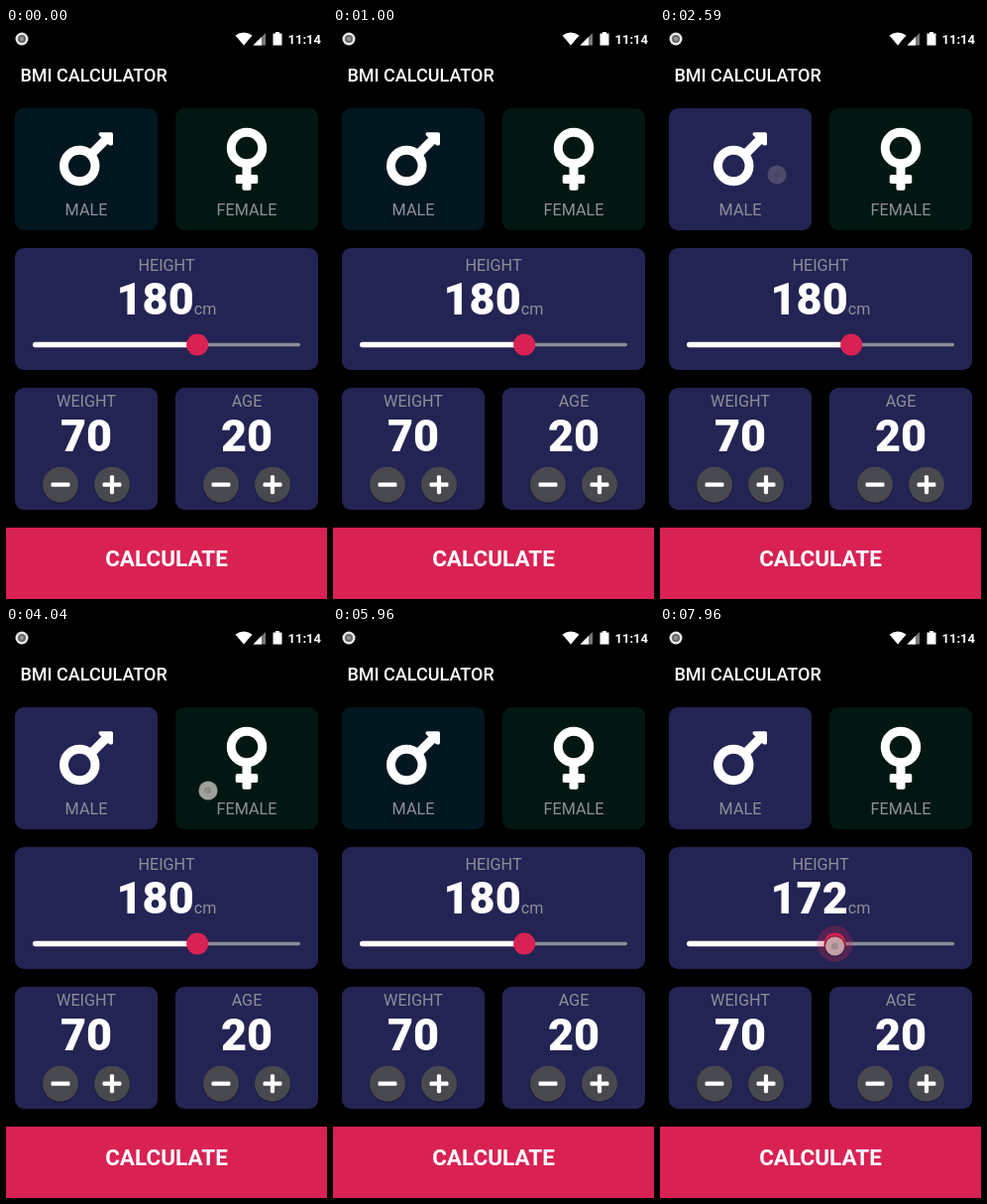
Write an HTML page that moves like this. It is 324 px wide and 576 px high and loops after 8000 ms.

```html
<!DOCTYPE html>
<html lang="en">
<head>
<meta charset="utf-8">
<title>BMI calculator</title>
<style>
  html, body { margin: 0; width: 100%; height: 100%; overflow: hidden; background: #000; }
  svg { display: block; width: 100%; height: 100%; font-family: Roboto, sans-serif; }
  .card { fill: #242454; }
  .label { font-size: 16.2px; fill: #8d8e98; }
  .number { font-size: 45px; font-weight: 900; }
  .mid { text-anchor: middle; }
  .white, .number { fill: #fff; }
  .ring { fill: none; stroke: #fff; stroke-width: 64; }
</style>
</head>
<body>
<svg viewBox="0 0 324 576">
  <defs>
    <g id="round">
      <circle cy="1" r="18.5" fill="#15152f" opacity=".6"/>
      <circle r="18" fill="#48494f"/>
      <rect class="white" x="-9.5" y="-2.1" width="19" height="4.2" rx="1.4"/>
    </g>
    <g id="plus">
      <use href="#round"/>
      <rect class="white" x="-2.1" y="-9.5" width="4.2" height="19" rx="1.4"/>
    </g>
  </defs>

  <!-- Status bar -->
  <circle cx="16" cy="11" r="6.5" fill="#e8e8e8"/>
  <circle cx="16" cy="11" r="4" fill="#666"/>
  <circle cx="16" cy="11" r="2" fill="#999"/>
  <path class="white" d="M231.5 7.5Q240 1.5 248.5 7.5L240 17.5Z"/>
  <path fill="#777" d="M249.5 17.5L262 5V17.5Z"/>
  <path class="white" d="M249.5 17.5L258 9V17.5Z"/>
  <path class="white" d="M269.5 5.5H272V4H276V5.5H278.5V17.5H269.5Z"/>
  <text class="white" x="284.5" y="16" font-size="13" font-weight="600">11:14</text>
  <text class="white" x="14.4" y="54" font-size="18" font-weight="500">BMI CALCULATOR</text>

  <!-- Gender cards -->
  <rect id="male" class="card" x="9" y="81" width="144" height="123" rx="9"/>
  <rect id="female" class="card" x="171" y="81" width="144" height="123" rx="9"/>
  <g transform="translate(54 96.3) scale(.1406)">
    <circle class="ring" cx="144" cy="304" r="112"/>
    <path d="M230 218L340 108" stroke="#fff" stroke-width="64"/>
    <path class="white" d="M372 64H293C282.3 64 277 76.9 284.5 84.4L351.6 151.5C359.2 159.1 384 165.7 384 143V76C384 69.4 378.6 64 372 64Z"/>
  </g>
  <g transform="translate(222.75 96.3) scale(.1406)">
    <circle class="ring" cx="144" cy="176" r="112"/>
    <rect class="white" x="112" y="300" width="64" height="180" rx="12"/>
    <rect class="white" x="64" y="368" width="160" height="64" rx="12"/>
  </g>
  <text class="label mid" x="81" y="189">MALE</text>
  <text class="label mid" x="243" y="189">FEMALE</text>

  <!-- Height card -->
  <rect class="card" x="9" y="222" width="306" height="123" rx="9"/>
  <text class="label mid" x="162" y="245">HEIGHT</text>
  <text class="mid" x="162" y="289"><tspan id="height" class="number">180</tspan><tspan class="label">cm</tspan></text>
  <rect x="27" y="317.7" width="270" height="3.6" rx="1.8" fill="#8d8e98"/>
  <rect id="track" class="white" x="27" y="316.8" height="5.4" rx="2.7"/>
  <g id="thumb">
    <circle id="glow" fill="#d92253" opacity=".26"/>
    <circle r="11" fill="#d92253"/>
  </g>

  <!-- Weight and age cards -->
  <rect class="card" x="9" y="363" width="144" height="123" rx="9"/>
  <rect class="card" x="171" y="363" width="144" height="123" rx="9"/>
  <text class="label mid" x="81" y="382">WEIGHT</text>
  <text class="label mid" x="243" y="382">AGE</text>
  <text class="number mid" x="81" y="426.5">70</text>
  <text class="number mid" x="243" y="426.5">20</text>
  <use href="#round" x="55" y="460.7"/>
  <use href="#plus" x="107" y="460.7"/>
  <use href="#round" x="217" y="460.7"/>
  <use href="#plus" x="269" y="460.7"/>

  <rect y="504" width="324" height="72" fill="#d92253"/>
  <text class="white mid" x="162" y="543" font-size="22.5" font-weight="700">CALCULATE</text>

  <g id="touch">
    <circle r="11" fill="#25232c" opacity=".35"/>
    <circle r="9.5" fill="#d4cfc8" opacity=".74"/>
    <circle r="3.5" fill="#77747a" opacity=".45"/>
  </g>
</svg>
<script>
  const LOOP = 8000;
  const ACTIVE = '#242454';
  const $ = id => document.getElementById(id);
  const clamp = v => Math.max(0, Math.min(1, v));
  const ease = v => v * v * (3 - 2 * v);

  const taps = [
    { down: 2430, up: 2540, x: 118, y: 148 },
    { down: 3980, up: 4100, x: 204, y: 165 },
    { down: 5430, up: 5540, x: 204, y: 165 },
    { down: 6600, up: 6710, x: 118, y: 148 },
    { down: 7590, up: 9000, x: 193, y: 322 }
  ];
  const [maleOn, femaleOn, femaleOff, maleAgain, drag] = taps;

  function draw(t) {
    const male = (t >= maleOn.up && t < femaleOn.up) || t >= maleAgain.up;
    const female = t >= femaleOn.up && t < femaleOff.up;
    $('male').style.fill = male ? ACTIVE : '#031721';
    $('female').style.fill = female ? ACTIVE : '#031712';

    // The slider spans 100 to 230 cm over 270 px.
    const height = Math.round(180 - 8 * ease(clamp((t - 7690) / 260)));
    const x = 27 + (height - 100) / 130 * 270;
    $('height').textContent = height;
    $('track').setAttribute('width', x - 27);
    $('thumb').setAttribute('transform', `translate(${x} 319.5)`);
    $('glow').setAttribute('r', 18 * ease(clamp((t - drag.down) / 150)));

    const tap = taps.find(p => t >= p.down && t < p.up + 75);
    const touch = $('touch');
    touch.setAttribute('opacity', tap ? clamp((t - tap.down) / 40) * clamp(1 - (t - tap.up) / 75) : 0);
    if (tap) touch.setAttribute('transform', `translate(${tap === drag ? x : tap.x} ${tap.y})`);
  }

  function frame() {
    draw(performance.now() % LOOP);
    requestAnimationFrame(frame);
  }
  frame();
</script>
</body>
</html>
```
